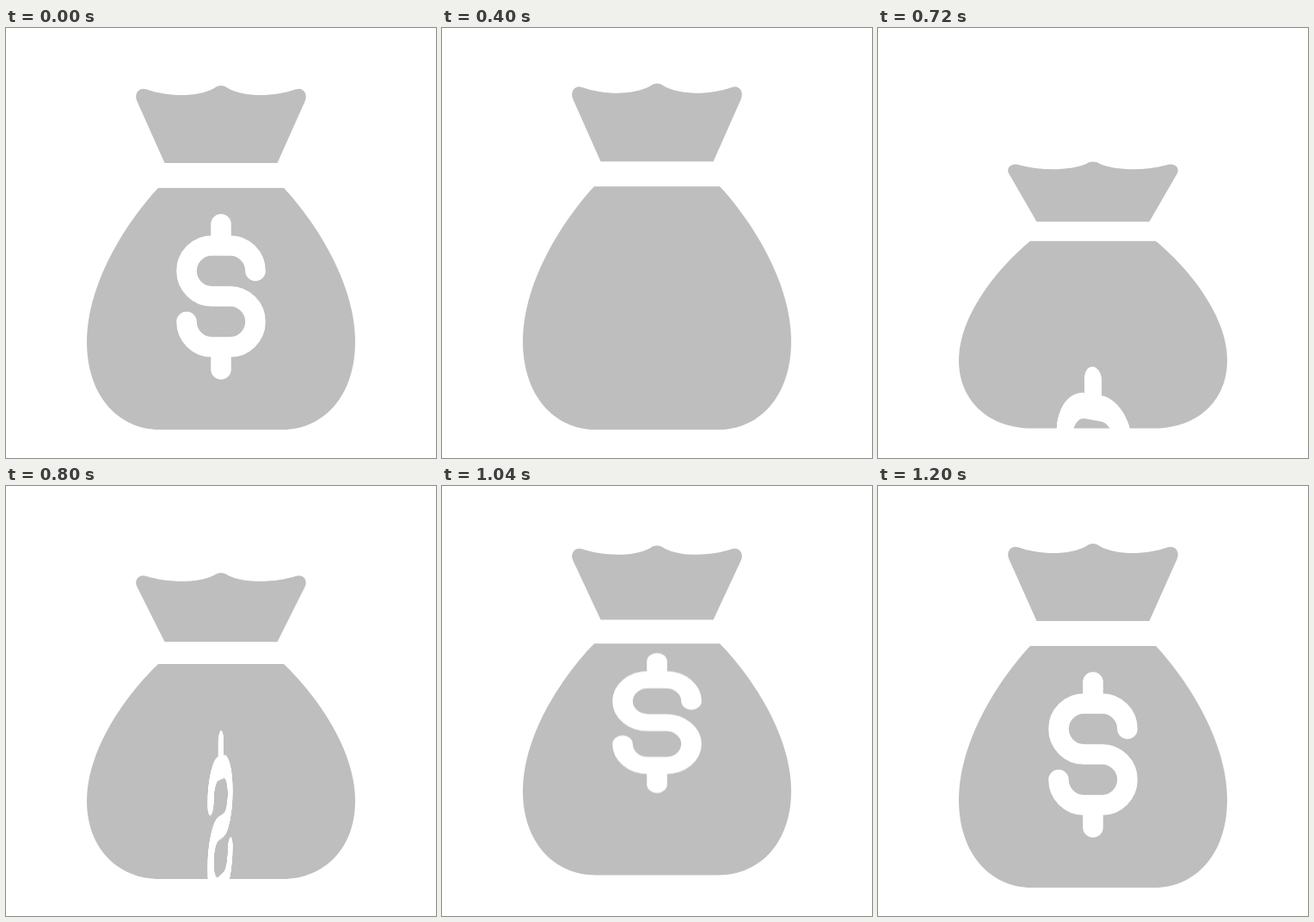
These frames come from a looping animation (500 px wide and 500 px high, 1360 ms). An HTML page:

```html
<!DOCTYPE html>
<html lang="en">
<head>
<meta charset="utf-8">
<title>Money bag</title>
<style>
  html, body { margin: 0; width: 100%; height: 100%; overflow: hidden; background: #fff; }
  #stage {
    position: absolute; left: 0; top: 0; width: 500px; height: 500px;
    overflow: hidden; perspective: 694px; perspective-origin: 250px 250px;
  }
  svg { position: absolute; left: 0; top: 0; width: 500px; height: 500px; overflow: visible; }
  #bag { fill: #bebebe; transform-origin: 250px 467px; }
  #coin {
    fill: none; stroke: #fff; stroke-width: 23.6; stroke-linecap: round;
    transform-origin: 250px 312.5px;
  }
</style>
</head>
<body>
<div id="stage">
  <svg id="bag" viewBox="0 0 500 500">
    <path d="M184.5 157 L152.3 85 C148.5 76 155 68.3 163 71.3 C189 80.5 223 80.5 242 70 C247 66 253 66 258 70
             C277 80.5 311 80.5 337 71.3 C345 68.3 351.5 76 347.7 85 L315.5 157 Z"/>
    <path d="M177 186 H323 C355 220 406 293 406 365 C406 427 370 467 321 467
             H179 C130 467 94 427 94 365 C94 293 145 220 177 186 Z"/>
  </svg>
  <svg id="coin" viewBox="0 0 500 500">
    <path d="M290 282.5 A29.5 29.5 0 0 0 260.5 253 H239.5 A29.5 29.5 0 0 0 239.5 312 H260.5
             A29.5 29.5 0 0 1 260.5 371 H239.5 A29.5 29.5 0 0 1 210 341.5
             M250 228 V253 M250 371 V397"/>
  </svg>
</div>
<script>
  const LOOP = 1360, STEP = 80, LAST = 15;
  const RETURN = 8, TOP = 13;   // steps where the symbol comes back and where it is highest
  const bag = document.getElementById('bag');
  const coin = document.getElementById('coin');

  const clamp = u => Math.max(0, Math.min(1, u));
  const mix = (a, b, u) => a + (b - a) * u;
  const ease = u => (1 - Math.cos(Math.PI * clamp(u))) / 2;

  // Rest, breathe in, squash, stretch, land, rest.
  const squash = [[4, 1], [5, 1.006], [8.48, 0.757], [12, 1.095], [TOP, 0.958], [LAST, 1]];

  function bagScale(n) {
    const i = squash.findIndex(k => k[0] >= n);
    if (i === 0) return 1;
    const [a, from] = squash[i - 1], [b, to] = squash[i];
    return mix(from, to, ease((n - a) / (b - a)));
  }

  function hop(n) {
    const start = 8.45;
    return 21.7 * Math.sin(Math.PI * clamp((n - start) / (LAST - start))) ** 2;
  }

  // The symbol drops out below, spins back up past its place, then settles.
  function coinPose(n) {
    if (n < RETURN) return { y: 37 * (n / 2) ** 2.5, turn: 0, scale: 1 - 0.031 * n };
    if (n < TOP) {
      const left = (TOP - n) / (TOP - RETURN);
      const spin = left ** 2.385;
      return { y: mix(-37, 374, spin), turn: -360 * spin, scale: mix(0.845, 1.387, left) };
    }
    const u = ease((n - TOP) / (LAST - TOP));
    return { y: mix(-37, 0, u), turn: 0, scale: mix(0.845, 1, u) };
  }

  function draw(now) {
    const n = Math.min(LAST, Math.floor((now % LOOP) / STEP));
    const { y, turn, scale } = coinPose(n);
    bag.style.transform = `translateY(${-hop(n)}px) scaleY(${bagScale(n)})`;
    coin.style.transform = `translateY(${y}px) rotateY(${turn}deg) scaleY(${scale})`;
  }

  const start = performance.now();
  function tick() {
    draw(performance.now() - start);
    requestAnimationFrame(tick);
  }
  tick();
</script>
</body>
</html>
```
